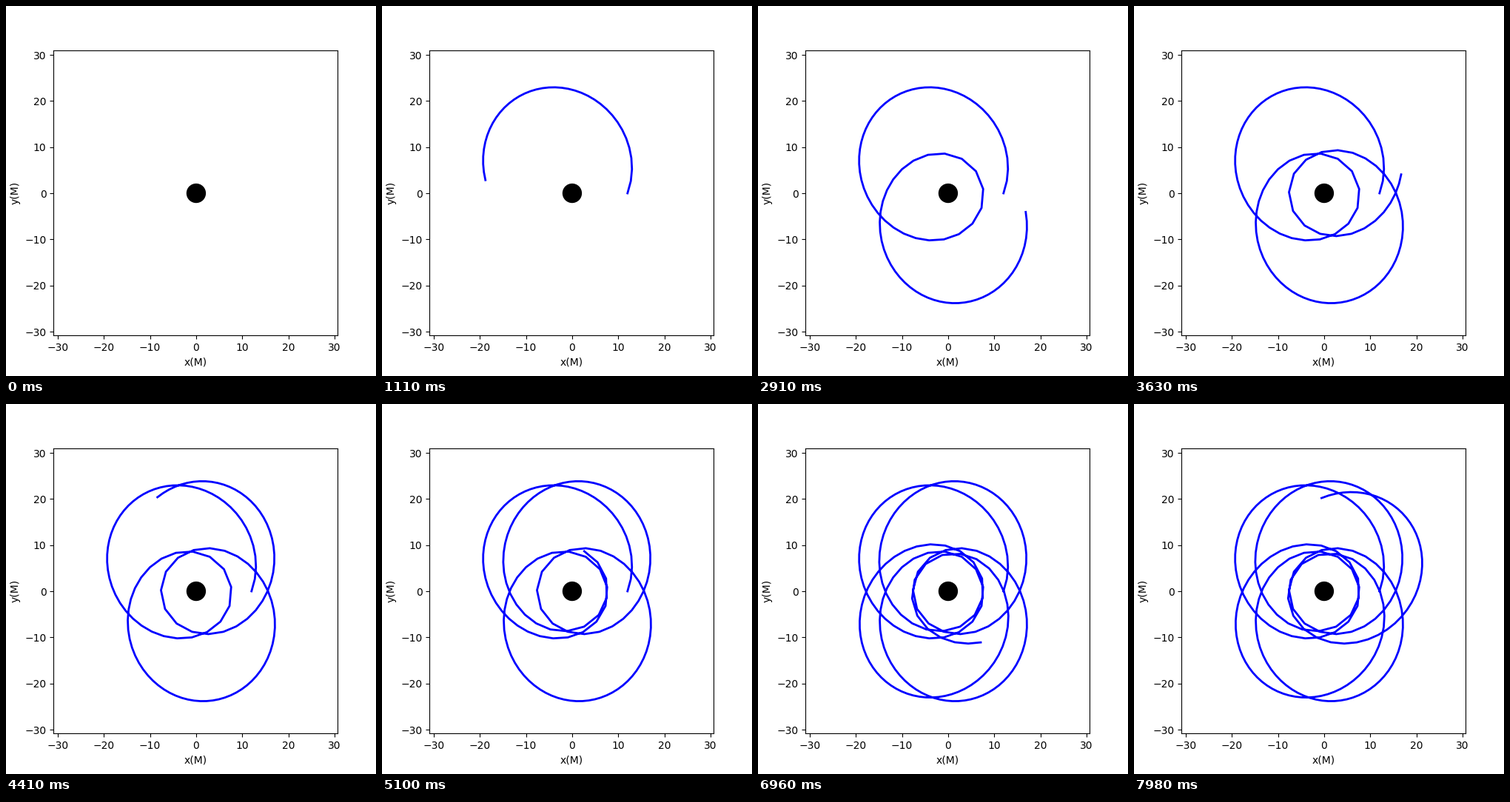
Write a matplotlib script that moves like this. It is 500 by 500 pixels and loops after 8000 ms.

```python
import math

import matplotlib.pyplot as plt
import numpy as np
from matplotlib.animation import FuncAnimation

# Bound orbit around a black hole of mass 1 (geometric units)
P, ECC = 11.57, 0.517          # semi-latus rectum, eccentricity
R_START = 12.0
ANG_MOM = P / math.sqrt(P - 3 - ECC**2)
D_TAU = 8.0                    # proper time between trail points
SUBSTEPS = 16

STEP_MS, TICK_MS, LOOP_MS = 30, 20, 8000
POINTS = LOOP_MS // STEP_MS + 1


def radius(chi):
    return P / (1 + ECC * math.cos(chi))


def rates(chi):
    """Proper-time derivatives of the radial phase and the azimuth."""
    dphi = ANG_MOM / radius(chi) ** 2
    dchi = dphi * math.sqrt(1 - 6 / P - 2 * ECC / P * math.cos(chi))
    return np.array([dchi, dphi])


def advance(state, h):
    k1 = rates(state[0])
    k2 = rates(state[0] + h / 2 * k1[0])
    k3 = rates(state[0] + h / 2 * k2[0])
    k4 = rates(state[0] + h * k3[0])
    return state + h / 6 * (k1 + 2 * k2 + 2 * k3 + k4)


def trace_orbit():
    state = np.array([math.acos((P / R_START - 1) / ECC), 0.0])
    path = []
    for _ in range(POINTS):
        chi, phi = state
        r = radius(chi)
        path.append((r * math.cos(phi), r * math.sin(phi)))
        for _ in range(SUBSTEPS):
            state = advance(state, D_TAU / SUBSTEPS)
    return np.array(path)


orbit = trace_orbit()

fig, ax = plt.subplots(figsize=(5, 5), dpi=100)
ax.set_aspect("equal")
ax.set_xlim(-30.92, 30.69)
ax.set_ylim(-30.80, 30.97)
ax.set_xticks(range(-30, 31, 10))
ax.set_yticks(range(-30, 31, 10))
ax.set_xlabel("x(M)")
ax.set_ylabel("y(M)")
ax.add_patch(plt.Circle((0, 0), 2, color="black"))
trail, = ax.plot([], [], color="blue", lw=2)


def draw(tick):
    n = min((tick * TICK_MS + TICK_MS // 2) // STEP_MS, POINTS - 1)
    shown = orbit[:n + 1] if n else orbit[:0]
    trail.set_data(shown[:, 0], shown[:, 1])
    return trail,


def reset():
    return draw(0)


anim = FuncAnimation(fig, draw, frames=LOOP_MS // TICK_MS, init_func=reset,
                     interval=TICK_MS, repeat=True, repeat_delay=0)
plt.show()
```
